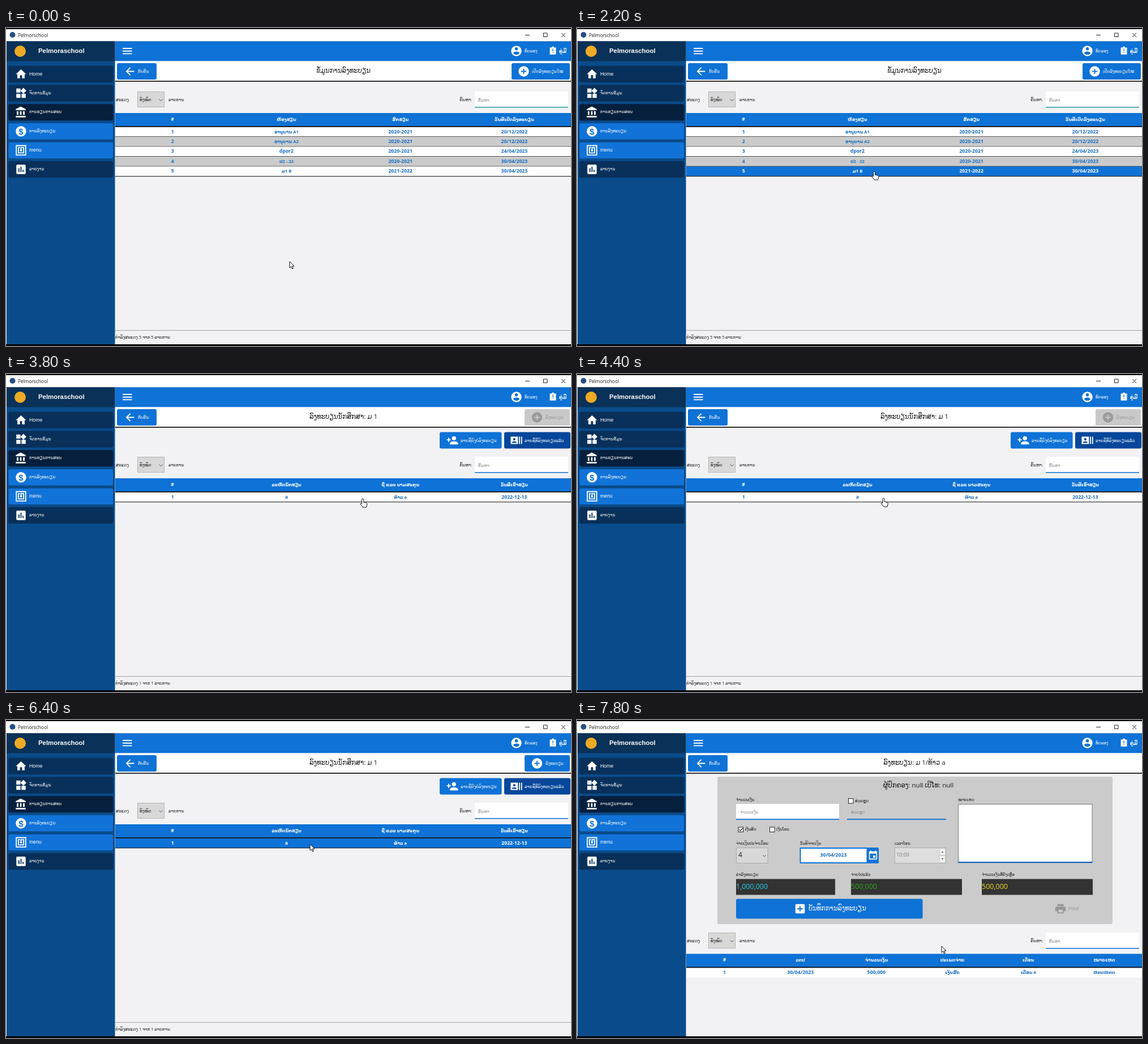
Recreate the animation shown at these times as an HTML page. Size 998 px wide and 561 px high, loop 8000 ms.

```html
<!DOCTYPE html>
<html lang="lo">
<head>
<meta charset="utf-8">
<title>School registration</title>
<style>
  html, body { margin: 0; width: 100%; height: 100%; overflow: hidden; background: #000; }
  svg { display: block; width: 998px; height: 561px; }
  text { font-family: "Open Sans", "DejaVu Sans", sans-serif; white-space: pre; }
  .latin { font-family: "Liberation Sans", "DejaVu Sans", sans-serif; }
</style>
</head>
<body>
<svg id="stage" viewBox="0 0 998 561"></svg>
<script>
const BLUE = '#0e72d6', NAVY = '#08305a', PAPER = '#f2f2f4', GRAY = '#cbcbcb', INK = '#1b1b1b', WHITE = '#fff';
const LOOP = 8000, STEP = 200;

const rect = (x, y, w, h, fill, more = '') =>
  `<rect x="${x}" y="${y}" width="${w}" height="${h}" fill="${fill}" ${more}/>`;
const text = (x, y, s, { size = 7.3, fill = INK, anchor = 'start', bold = false, cls = '' } = {}) =>
  `<text x="${x}" y="${y}" font-size="${size}" fill="${fill}" text-anchor="${anchor}" class="${cls}" font-weight="${bold ? 700 : 400}">${s}</text>`;
const line = (d, color = INK, width = 1) =>
  `<path d="${d}" fill="none" stroke="${color}" stroke-width="${width}"/>`;
const chevron = (x, y) => line(`M${x - 3} ${y - 1.5}l3 3 3-3`, '#555');

// Icons live on a 24-unit grid and are placed by their centre.
const disc = 'M2 12a10 10 0 1 0 20 0a10 10 0 1 0-20 0z';
const plus = 'M7 11h4V7h2v4h4v2h-4v4h-2v-4H7z';
const box = 'M5 3h14a2 2 0 0 1 2 2v14a2 2 0 0 1-2 2H5a2 2 0 0 1-2-2V5a2 2 0 0 1 2-2z';
const icons = {
  home: 'M10 20v-6h4v6h5v-8h3L12 3 2 12h3v8z',
  widgets: 'M13 13h8v8h-8zM3 13h8v8H3zM3 3h8v8H3zM16.7 1.7l5.6 5.6-5.6 5.7L11 7.3z',
  bank: 'M4 10h3v7H4zM10 10h3v7h-3zM16 10h3v7h-3zM2 19h19v3H2zM11.5 1L21 6v2H2V6z',
  coin: disc,
  card: 'M2 2h20v20H2zM4 4v16h16V4zM6 6h4v2H8v8h8V8h-3v2.3a2 2 0 1 1-2 0V6h7v12H6z',
  chart: box + 'M7 10h2v7H7zM11 7h2v10h-2zM15 13h2v4h-2z',
  back: 'M20 11H7.8l5.6-5.6L12 4l-8 8 8 8 1.4-1.4L7.8 13H20z',
  add: disc + plus,
  addBox: box + plus,
  user: disc + 'M9 8a3 3 0 1 1 6 0a3 3 0 1 1-6 0zM6 16q1-3 6-3t6 3q-2 3.2-6 3.2T6 16z',
  notice: 'M4 4h5a3 3 0 0 1 6 0h5v18H4zM11 7h2v7h-2zM11 16h2v2h-2z',
  addPerson: 'M11 8a4 4 0 1 1 8 0a4 4 0 1 1-8 0zM7 20v-2q1-4 8-4t8 4v2zM4 7h2v3h3v2H6v3H4v-3H1v-2h3z',
  roster: 'M21 5h2v14h-2zM17 5h2v14h-2zM1 5h14v14H1zM5.7 10a2.3 2.3 0 1 1 4.6 0a2.3 2.3 0 1 1-4.6 0zM3.5 17q0-3 4.5-3t4.5 3z',
  calendar: 'M3 3h3V1h2v2h8V1h2v2h3v18H3zM5 8v11h14V8zM12 12h5v5h-5z',
  printer: 'M6 3h12v4H6zM5 8h14a3 3 0 0 1 3 3v6h-4v4H6v-4H2v-6a3 3 0 0 1 3-3zM8 14v5h8v-5z'
};
const icon = (name, x, y, fill = WHITE, k = 0.92) =>
  `<path d="${icons[name]}" fill="${fill}" fill-rule="evenodd" transform="translate(${x - 12 * k} ${y - 12 * k}) scale(${k})"/>`;

const button = (x, y, w, h, name, iconX, labelX, label, fill = BLUE, fg = WHITE) =>
  rect(x, y, w, h, fill, 'rx="3"') + icon(name, iconX, y + h / 2, fg) + text(labelX, y + h / 2 + 2.5, label, { fill: fg });

const menu = [
  ['home', 'Home', NAVY], ['widgets', 'ຈັດການຂໍ້ມູນ', NAVY], ['bank', 'ການຮຽນການສອນ', '#051f3d'],
  ['coin', 'ການລົງທະບຽນ', '#1173d8'], ['card', 'menu', '#1173d8'], ['chart', 'ລາຍງານ', NAVY]
];

function windowFrame() {
  let s = rect(0, 0, 998, 561, '#000') + rect(0, 2, 998, 21.5, WHITE) + rect(0, 23.5, 998, 534.5, PAPER)
    + '<circle cx="11.5" cy="12" r="5" fill="#244f86"/>' + text(21, 15.5, 'Pelmorschool', { size: 8.3 })
    + line('M917 12.5h8M949.5 9h6.5v6.5h-6.5zM981 9l7 7M981 16l7-7', '#222')
    + rect(193, 23.5, 805, 35, BLUE) + rect(1, 23.5, 191.5, 534.5, '#0a4c8b') + rect(1, 23.5, 191.5, 35, '#0a3157')
    + '<circle cx="25" cy="41" r="10" fill="#edaa24"/>'
    + text(57, 44, 'Pelmoraschool', { size: 11.4, fill: WHITE, bold: true, cls: 'latin' })
    + line('M206 36h16.5M206 40.7h16.5M206 45.4h16.5', WHITE, 1.9)
    + icon('user', 901.5, 40.5) + text(916, 43, 'ທົດລອງ', { fill: WHITE })
    + icon('notice', 966, 40, WHITE, 0.68) + text(977, 44, 'ຄູ່ມື', { size: 8.3, fill: WHITE, bold: true });
  menu.forEach(([name, label, fill], i) => {
    const y = 66.8 + 33.6 * i, latin = /^\w+$/.test(label);
    s += rect(4, y, 185.5, 29.3, fill, 'rx="3" stroke="#0a3c70" stroke-width=".6"') + icon(name, 26.5, y + 14.6)
      + text(41, y + (latin ? 16.7 : 16.2), label, { size: latin ? 8.8 : 7.4, fill: WHITE, cls: latin ? 'latin' : '' });
    if (name === 'coin') s += text(26.5, y + 20, '$', { size: 15, fill, anchor: 'middle', bold: true, cls: 'latin' });
  });
  return s;
}

const heading = title => rect(193, 58.5, 805, 35, WHITE) + rect(193, 93, 805, 1.7, '#111')
  + button(196, 62, 70, 29, 'back', 219, 233, 'ກັບຄືນ')
  + text(596, 79, title, { size: 11.6, anchor: 'middle' });

const toolbar = (y, accent = BLUE) => text(194, y + 16.5, 'ສະແດງ')
  + rect(232.5, y + .5, 47, 27, '#d8d8d8', 'stroke="#b4b4b4"') + text(236, y + 16.5, 'ທັງໝົດ') + chevron(273.5, y + 15)
  + text(287, y + 16.5, 'ລາຍການ') + text(823, y + 16.5, 'ຄົ້ນຫາ:', { anchor: 'end' })
  + rect(828, y, 165, 28, WHITE) + rect(828, y + 27, 165, 1.5, accent) + text(834, y + 18, 'ຄົ້ນຫາ', { fill: '#888' });

const footer = n => line('M193 533.5h805', '#a0a0a0') + text(193, 547.5, `ກຳລັງສະແດງ ${n} ຈາກ ${n} ລາຍການ`);

function table(y, columns, rows, { selected = -1, ruled = true } = {}) {
  const width = 805 / columns.length;
  const cells = (values, base, fill) => values.map((v, i) =>
    text(193.5 + width * (i + .5), base, v, { size: /[ກ-ໝ]/.test(v) ? 7.6 : 8.7, fill, anchor: 'middle', bold: true })).join('');
  let s = rect(193, y, 805, 24, BLUE) + cells(columns, y + 13.8, WHITE);
  rows.forEach((row, i) => {
    const top = y + 24.5 + 17.45 * i, chosen = i === selected;
    s += rect(193, top, 805, 17.45, chosen ? BLUE : i % 2 ? GRAY : WHITE) + cells(row, top + 11, chosen ? WHITE : '#1a70c4');
    if (ruled) s += rect(193, top + 16.8, 805, 1, '#111');
  });
  return s + rect(193, y + 23, 805, 1.8, '#111');
}

const classList = selected => heading('ຂໍ້ມູນການລົງທະບຽນ')
  + button(893, 62, 103, 29, 'add', 914.5, 929, 'ເປີດລົງທະບຽນໃໝ່') + toolbar(112, '#259aa0')
  + table(150, ['#', 'ຫ້ອງຮຽນ', 'ສົກຮຽນ', 'ວັນທີ່ເປີດລົງທະບຽນ'], [
    ['1', 'ອານຸບານ A1', '2020-2021', '20/12/2022'],
    ['2', 'ອານຸບານ A2', '2020-2021', '20/12/2022'],
    ['3', 'dpor2', '2020-2021', '24/04/2023'],
    ['4', 'ປ2 - 22', '2020-2021', '30/04/2023'],
    ['5', 'ມ1 B', '2021-2022', '30/04/2023']
  ], { selected }) + footer(5);

const studentList = selected => heading('ລົງທະບຽນນັກສຶກສາ: ມ 1')
  + button(916, 62, 80, 29, 'add', 938, 953, 'ລົງທະບຽນ', selected < 0 ? '#c9c9c9' : BLUE, selected < 0 ? '#9b9b9b' : WHITE)
  + button(766, 102.5, 109.5, 29, 'addPerson', 788.5, 803, 'ລາຍຊື່ຍັງບໍ່ລົງທະບຽນ')
  + button(880, 102.5, 117, 29, 'roster', 901.5, 916, 'ລາຍຊື່ທີ່ລົງທະບຽນແລ້ວ', '#06479b')
  + toolbar(146) + table(184, ['#', 'ລະຫັດນັກຮຽນ', 'ຊື່ ແລະ ນາມສະກຸນ', 'ວັນທີ່ເຂົ້າຮຽນ'],
    [['1', 'a', 'ທ້າວ a', '2022-12-13']], { selected }) + footer(1);

function paymentForm() {
  const label = (x, y, s, fill = INK) => text(x, y, s, { size: 7, fill });
  const check = (x, y, s, on) => rect(x + .5, y + .5, 8.5, 8.5, WHITE, 'stroke="#222"')
    + (on ? line(`M${x + 2} ${y + 5}l2 2 4-4.5`, '#222', 1.2) : '') + label(x + 12, y + 6.5, s);
  const total = (x, w, name, value, fill) => label(x, 275, name) + rect(x, 280.5, w, 28, '#333')
    + text(x, 297.5, value, { size: 12.5, fill });
  return heading('ລົງທະບຽນ: ມ 1/ທ້າວ a') + rect(248, 100, 698, 260, GRAY, 'rx="3"')
    + text(603, 119, 'ຜູ້ປົກຄອງ: null ເບີໂທ: null', { size: 11.6, anchor: 'middle' })
    + label(281, 143, 'ຈຳນວນເງິນ') + rect(281, 148, 182, 28, WHITE) + rect(281, 174.3, 182, 1.8, BLUE)
    + label(288, 165, 'ຈຳນວນເງິນ', '#888')
    + check(479, 138, 'ສ່ວນຫຼຸດ') + label(484, 165, 'ສ່ວນຫຼຸດ', '#888') + rect(477, 174.3, 175, 1.8, BLUE)
    + label(673, 143, 'ໝາຍເຫດ') + rect(673.5, 148.5, 236.5, 103, WHITE, 'stroke="#777"') + rect(673, 250, 237.5, 2.2, '#1260b8')
    + check(284.5, 188.5, 'ເງິນສົດ', true) + check(340, 188.5, 'ເງິນໂອນ')
    + label(281, 219.5, 'ຈ່າຍເງິນປະຈຳເດືອນ') + rect(281.5, 225.5, 55.5, 27, '#d8d8d8', 'stroke="#aaa"')
    + text(285, 242, '4', { size: 12 }) + chevron(331, 239.5)
    + label(394, 219.5, 'ວັນທີຈ່າຍເງິນ') + rect(394.5, 226, 118, 26, WHITE, `stroke="${BLUE}" stroke-width="2"`)
    + text(453, 241.2, '30/04/2023', { size: 8.7, fill: '#1a70c4', anchor: 'middle', bold: true })
    + rect(512.5, 225, 20.5, 28, BLUE, 'rx="2"') + icon('calendar', 523, 239, WHITE, .8)
    + label(561, 219.5, 'ເວລາໂອນ') + rect(561.5, 225.5, 90, 27, '#dedede', 'stroke="#b0b0b0"')
    + text(564, 241.3, '10:09', { size: 9, fill: '#777' })
    + rect(640.5, 226.5, 10, 12, '#f4f4f4', 'stroke="#ccc"') + rect(640.5, 239.5, 10, 12, '#f4f4f4', 'stroke="#ccc"')
    + '<path d="M643.5 234l2-2.5 2 2.5zM643.5 244l2 2.5 2-2.5z" fill="#555"/>'
    + total(281, 175, 'ຄ່າລົງທະບຽນ', '1,000,000', '#22cfe8')
    + total(484, 196, 'ຈ່າຍໄປແລ້ວ', '500,000', '#2ea51c')
    + total(715, 196, 'ຈຳນວນເງິນທີ່ຍັງເຫຼືອ', '500,000', '#eedc20')
    + rect(281, 315.5, 329.5, 35, BLUE, 'rx="3"') + icon('addBox', 394, 333)
    + text(409, 335.5, 'ບັນທຶກການລົງທະບຽນ', { size: 11.5, fill: WHITE })
    + icon('printer', 854, 333, '#969696') + text(868, 335.5, 'Print', { size: 8.8, fill: '#969696', cls: 'latin' })
    + toolbar(375)
    + table(412.5, ['#', 'ວດປ', 'ຈຳນວນເງິນ', 'ປະເພດຈ່າຍ', 'ເດືອນ', 'ໝາຍເຫດ'],
      [['1', '30/04/2023', '500,000', 'ເງິນສົດ', 'ເດືອນ 4', 'ຫກດຫກດ']], { ruled: false });
}

// Each screen starts at its time; hover is the row area that shows the hand.
const screens = [
  { at: 0, html: classList(-1), hover: [175, 261] },
  { at: 2000, html: classList(4), hover: [175, 261] },
  { at: 2400, html: studentList(-1), hover: [209, 226] },
  { at: 4800, html: studentList(0), hover: [209, 226] },
  { at: 6200, html: studentList(0), hover: [0, 0] },
  { at: 6600, html: paymentForm(), hover: [437, 454] }
];
const pointerPath = [
  [0, 501, 412], [400, 501, 412], [1600, 525, 253], [2400, 525, 253], [3600, 630, 220], [3800, 630, 220],
  [4600, 525, 219], [6000, 525, 219], [6200, 537, 219], [6600, 537, 219], [7800, 644, 399], [LOOP, 644, 399]
];

const stage = document.getElementById('stage');
stage.innerHTML = windowFrame() + screens.map(s => `<g class="screen">${s.html}</g>`).join('')
  + `<g id="pointer" fill="#fff" stroke="#111" stroke-width="1" stroke-linejoin="round">
    <path id="arrow" d="M0 0V11.2l2.6-2.4 1.9 4.2 1.8-.8-1.9-4.1h3.6z"/>
    <path id="hand" d="M-1.5 1.5a1.5 1.5 0 0 1 3 0V6l5 1.2q1.8.6 1.3 3L6.5 15H.5L-4 9.5q0-2 2.5-.8z"/></g>`;
const groups = stage.querySelectorAll('.screen');
const [pointer, arrow, hand] = ['pointer', 'arrow', 'hand'].map(id => document.getElementById(id));

function pointerAt(t) {
  const i = pointerPath.findIndex(p => p[0] > t);
  const [t0, x0, y0] = pointerPath[i - 1], [t1, x1, y1] = pointerPath[i];
  const u = (t - t0) / (t1 - t0), e = u * u * (3 - 2 * u);
  return [x0 + (x1 - x0) * e, y0 + (y1 - y0) * e];
}

function draw(now) {
  const t = Math.floor(now % LOOP / STEP) * STEP;
  const current = screens.filter(s => s.at <= t).length - 1;
  const [x, y] = pointerAt(t), [top, bottom] = screens[current].hover;
  const pointing = y >= top && y <= bottom;
  groups.forEach((g, i) => g.setAttribute('display', i === current ? 'inline' : 'none'));
  pointer.setAttribute('transform', `translate(${x} ${y})`);
  arrow.setAttribute('display', pointing ? 'none' : 'inline');
  hand.setAttribute('display', pointing ? 'inline' : 'none');
}

const start = performance.now();
function tick() {
  draw(performance.now() - start);
  requestAnimationFrame(tick);
}
tick();
</script>
</body>
</html>
```
